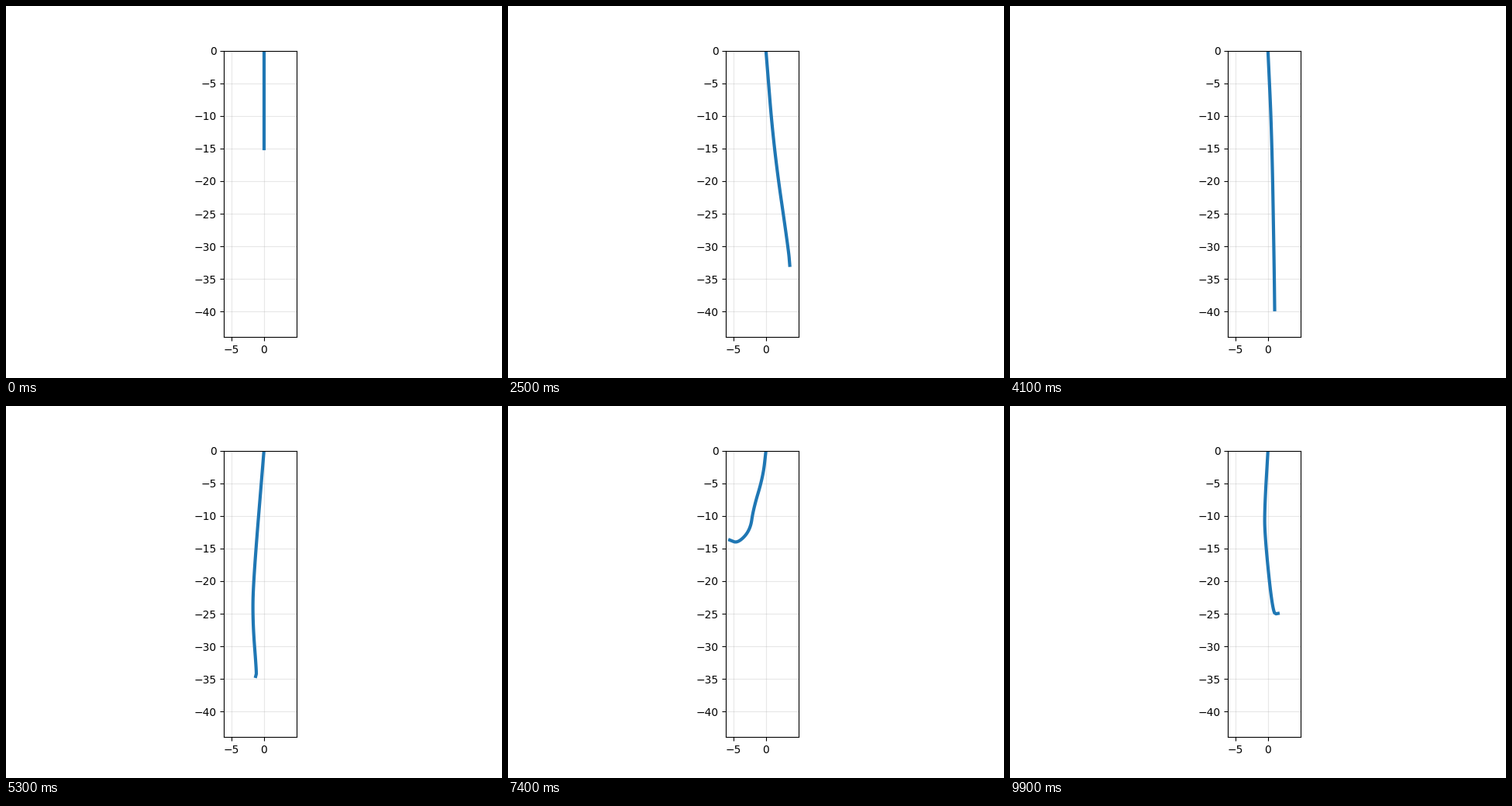
Animation, 640 px wide and 480 px high, one loop 10 s. Source, as a matplotlib script:

```python
import numpy as np
import matplotlib.pyplot as plt
from matplotlib.animation import FuncAnimation

FRAMES, INTERVAL = 100, 100
NODES = 81

# Bend points of the rope below its fixed end at a few key steps.
POSES = {
    0: [(0, -15)],
    11: [(.8, -10.5), (2.9, -17.6)],
    20: [(1.3, -15), (4.54, -27.4)],
    25: [(1.2, -15), (3.45, -30.5), (3.65, -32.9)],
    41: [(.6, -13), (.95, -33), (1.03, -39.7)],
    53: [(-1.6, -19.5), (-1.75, -26), (-1.1, -34.4), (-1.27, -34.6)],
    66: [(-1.2, -9), (-3.2, -19.5), (-5.1, -20.1)],
    74: [(-.45, -4), (-1.95, -9), (-2.4, -12.2), (-4.3, -14.2), (-5.55, -13.7)],
    90: [(-.25, -6.5), (-2.3, -14), (-1.3, -15.9), (.15, -15)],
    99: [(-.5, -8.5), (-.5, -13), (.75, -25.1), (1.55, -24.95)],
}


def rope(bends):
    """Round the bends by corner cutting, then space the nodes evenly."""
    p = np.array([(0, 0)] + bends, float)
    for _ in range(5):
        cuts = np.stack([.75 * p[:-1] + .25 * p[1:],
                         .25 * p[:-1] + .75 * p[1:]], axis=1)
        p = np.vstack([p[:1], cuts.reshape(-1, 2), p[-1:]])
    s = np.append(0, np.cumsum(np.hypot(*np.diff(p, axis=0).T)))
    q = np.linspace(0, s[-1], NODES)
    return np.column_stack([np.interp(q, s, p[:, 0]), np.interp(q, s, p[:, 1])])


def spline(t, p, q):
    """Natural cubic spline through rows p at knots t, sampled at q."""
    n, h = len(t), np.diff(t)
    a, r = np.eye(n), np.zeros_like(p)
    for i in range(1, n - 1):
        a[i, i - 1:i + 2] = h[i - 1], 2 * (h[i - 1] + h[i]), h[i]
    r[1:-1] = 6 * np.diff(np.diff(p, axis=0) / h[:, None], axis=0)
    m = np.linalg.solve(a, r)
    i = np.clip(np.searchsorted(t, q, side="right") - 1, 0, n - 2)
    u = ((q - t[i]) / h[i])[:, None]
    v = 1 - u
    bend = (v**3 - v) * m[i] + (u**3 - u) * m[i + 1]
    return v * p[i] + u * p[i + 1] + h[i][:, None]**2 / 6 * bend


keys = np.array(list(POSES), float)
shapes = np.array([rope(b).ravel() for b in POSES.values()])
path = spline(keys, shapes, np.arange(FRAMES)).reshape(FRAMES, NODES, 2)

fig, ax = plt.subplots(figsize=(6.4, 4.8), dpi=100)
ax.set_aspect("equal")
ax.set_xlim(-6.12, 4.97)
ax.set_ylim(-43.9, 0)
ax.set_xticks([-5, 0])
ax.set_yticks(range(-40, 1, 5))
ax.grid(alpha=0.3)
line, = ax.plot([], [], lw=3, color="C0")


def update(i):
    line.set_data(*path[i].T)
    return line,


anim = FuncAnimation(fig, update, frames=FRAMES, interval=INTERVAL, repeat=True)
plt.show()
```
